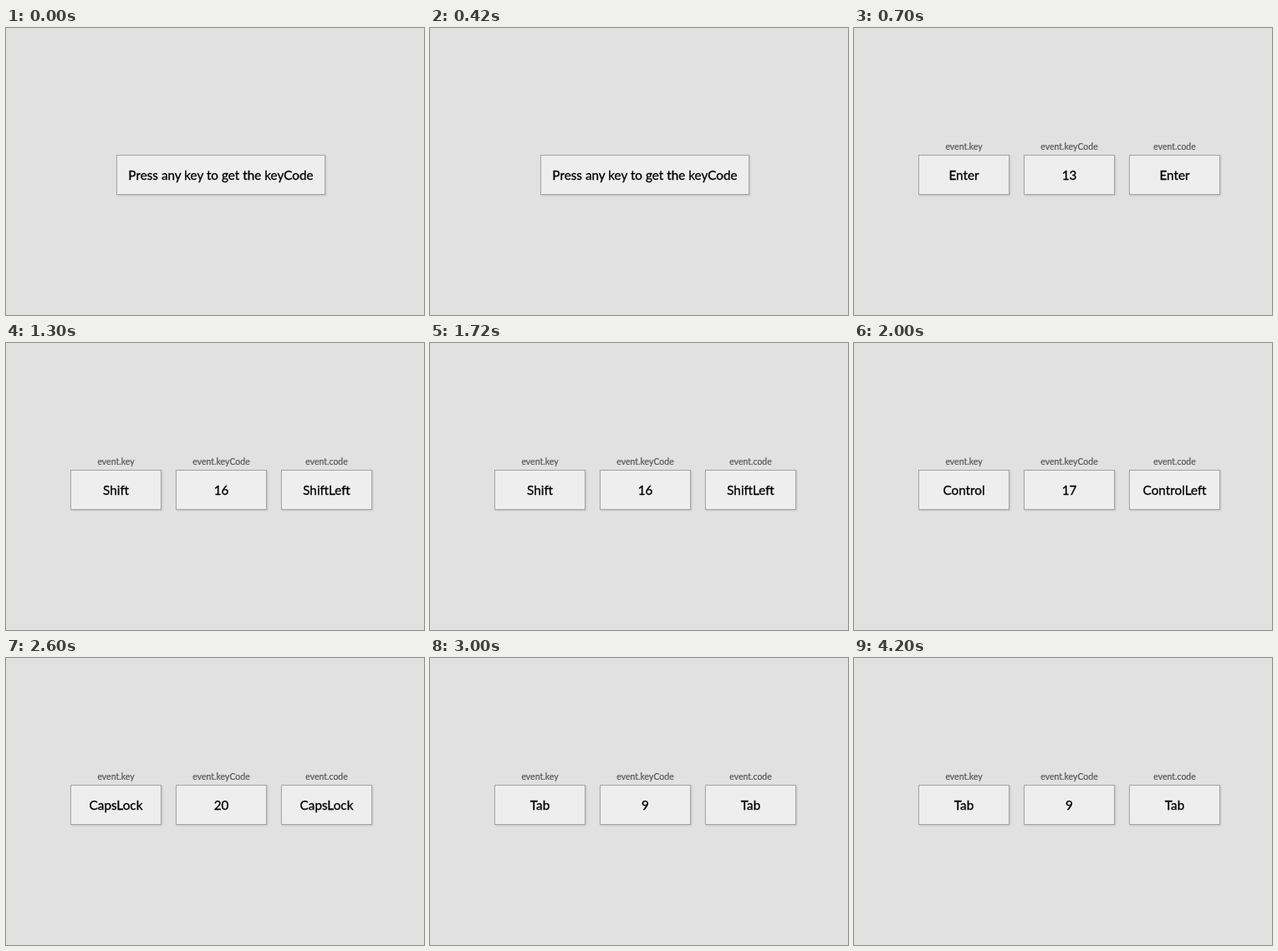
An HTML page that plays this animation: 500x344 px, repeating every 5000 ms.

```html
<!DOCTYPE html>
<html lang="en">
<head>
<meta charset="utf-8">
<title>Key codes</title>
<style>
  html, body {
    margin: 0;
    width: 100%;
    height: 100%;
    overflow: hidden;
    background: #e1e1e1;
  }
  body {
    position: relative;
    font: 400 15.3px/46px Lato, "Open Sans", sans-serif;
    color: #000;
  }
  .strip {
    position: absolute;
    top: 0;
    left: 0;
    width: 500px;
    animation: press 5s step-end infinite;
  }
  .screen {
    position: relative;
    width: 500px;
    height: 344px;
    overflow: hidden;
  }
  .box {
    position: absolute;
    top: 152px;
    width: 109px;
    height: 48px;
    box-sizing: border-box;
    border: 1px solid #a4a4a4;
    background: #eee;
    box-shadow: 1px 1px 2px rgba(0, 0, 0, .14);
    text-align: center;
    white-space: nowrap;
    -webkit-text-stroke: .3px;
  }
  .prompt {
    left: 132px;
    width: 250px;
  }
  .label {
    position: absolute;
    top: -18px;
    left: -1px;
    width: 109px;
    font-size: 10.5px;
    line-height: 14px;
    color: #555;
    -webkit-text-stroke-width: .2px;
  }
  /* each step shows the next screen of the strip */
  @keyframes press {
    0%   { transform: translateY(0); }
    14%  { transform: translateY(-344px); }
    26%  { transform: translateY(-688px); }
    40%  { transform: translateY(-1032px); }
    52%  { transform: translateY(-1376px); }
    60%, 100% { transform: translateY(-1720px); }
  }
</style>
</head>
<body>
<div class="strip" id="strip">
  <div class="screen"><div class="box prompt">Press any key to get the keyCode</div></div>
</div>
<script>
  const labels = ['event.key', 'event.keyCode', 'event.code'];
  const presses = [
    ['Enter', 13, 'Enter'],
    ['Shift', 16, 'ShiftLeft'],
    ['Control', 17, 'ControlLeft'],
    ['CapsLock', 20, 'CapsLock'],
    ['Tab', 9, 'Tab']
  ];

  const box = (value, i) =>
    `<div class="box" style="left:${77 + i * 126}px">` +
    `<div class="label">${labels[i]}</div>${value}</div>`;

  const screen = values => `<div class="screen">${values.map(box).join('')}</div>`;

  document.getElementById('strip')
    .insertAdjacentHTML('beforeend', presses.map(screen).join(''));
</script>
</body>
</html>
```
